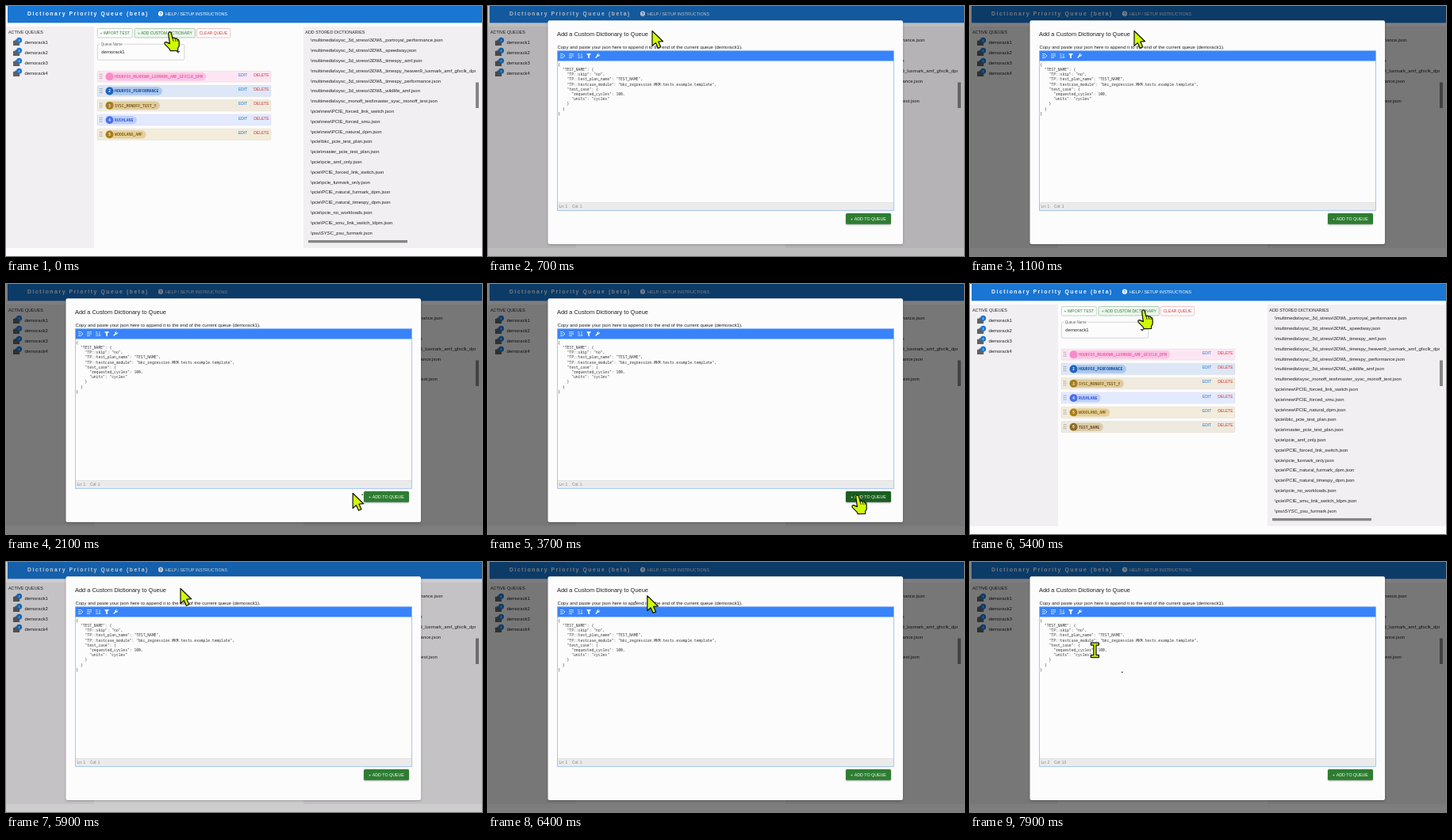
Recreate the animation shown at these times as an HTML page with a canvas. Size 600 px wide and 316 px high, loop 8000 ms.

```html
<!DOCTYPE html>
<html lang="en">
<head>
<meta charset="utf-8">
<title>Dictionary Priority Queue</title>
<style>
html, body { margin: 0; width: 100%; height: 100%; overflow: hidden; background: #fff; }
canvas { display: block; width: 600px; height: 316px; }
</style>
</head>
<body>
<canvas id="stage"></canvas>
<script>
const W = 600, H = 316, LOOP = 8000;
const SANS = '"Liberation Sans", Arial, sans-serif';
const MONO = '"Noto Sans Mono", "DejaVu Sans Mono", monospace';
const BLUE = '#1976d2', RED = '#d32f2f', GREEN = '#2e7d32', DARK_GREEN = '#1b5e20';
const PAPER = '#fdfcfd', PANEL = '#f1eff1', LIME = '#cffa06';

const canvas = document.getElementById('stage');
const ctx = canvas.getContext('2d');
const ratio = window.devicePixelRatio || 1;
canvas.width = W * ratio;
canvas.height = H * ratio;

const clamp = v => Math.max(0, Math.min(1, v));
const smooth = v => v * v * (3 - 2 * v);

// ---- timing ----
const OPEN_1 = 500, CLOSE = 3800, OPEN_2 = 5750, CARET_SET = 7100;

// time, x, y, eased arrival
const PATH = [
  [0, 208, 34], [400, 208, 34], [550, 207, 32], [1700, 207, 32],
  [2100, 437, 265], [2300, 467, 268], [4430, 467, 268], [4530, 466, 268],
  [5200, 220, 34, true], [6200, 220, 34], [6900, 124, 80, true],
  [7700, 124, 80], [7900, 157, 111], [8000, 200, 146]
];

function pointerAt(t) {
  const i = Math.max(1, PATH.findIndex(k => k[0] >= t));
  const [t0, x0, y0] = PATH[i - 1], [t1, x1, y1, eased] = PATH[i];
  let u = clamp((t - t0) / (t1 - t0));
  if (eased) u = smooth(u);
  return { x: x0 + (x1 - x0) * u, y: y0 + (y1 - y0) * u };
}

function openness(t) {
  if (t < CLOSE) return clamp((t - OPEN_1) / 400);
  if (t < OPEN_2) return 1 - clamp((t - CLOSE) / 200);
  return clamp((t - OPEN_2) / 400);
}

// ---- drawing helpers ----
function rect(x, y, w, h, fill) {
  ctx.fillStyle = fill;
  ctx.fillRect(x, y, w, h);
}

function box(x, y, w, h, r, fill, stroke, line = 0.6) {
  ctx.beginPath();
  ctx.roundRect(x, y, w, h, r);
  if (fill) { ctx.fillStyle = fill; ctx.fill(); }
  if (stroke) { ctx.strokeStyle = stroke; ctx.lineWidth = line; ctx.stroke(); }
}

function raised(blur, alpha, paint) {
  ctx.save();
  ctx.shadowColor = `rgba(0,0,0,${alpha})`;
  ctx.shadowBlur = blur * ratio;
  ctx.shadowOffsetY = ratio;
  paint();
  ctx.restore();
}

function disc(x, y, r, fill) {
  ctx.beginPath();
  ctx.arc(x, y, r, 0, Math.PI * 2);
  ctx.fillStyle = fill;
  ctx.fill();
}

function shape(path, fill, stroke, line) {
  const p = new Path2D(path);
  if (fill) { ctx.fillStyle = fill; ctx.fill(p); }
  if (stroke) { ctx.strokeStyle = stroke; ctx.lineWidth = line; ctx.stroke(p); }
}

// y is the middle of the capitals
function text(str, x, y, size, fill, { font = SANS, weight = 400, spacing = 0, align = 'left' } = {}) {
  ctx.font = `${weight} ${size}px ${font}`;
  ctx.letterSpacing = spacing + 'px';
  ctx.textAlign = align;
  ctx.textBaseline = 'alphabetic';
  ctx.fillStyle = fill;
  ctx.fillText(str, x, y + size * 0.36);
}

const inside = (p, x, y, w, h) => p.x >= x && p.x < x + w && p.y >= y && p.y < y + h;

// ---- page ----
// name, row, chip, number disc, ink
const ROWS = [
  ['HOURFOX_MEADOW9_LUXMARK_AMF_GFXCLK_DPM', '#fde6f3', '#fac6e3', '#f88cc8', '#f25fac'],
  ['HOURFOX_PERFORMANCE', '#dde7f6', '#abc7ee', '#1c62c0', '#1c4f9c'],
  ['SYSC_MONOFF_TEST_Y', '#f0ebde', '#dfcb9c', '#a57c1b', '#80611c'],
  ['RUSHLANE', '#e3eaff', '#bccffc', '#4a70ea', '#3659cf'],
  ['WOODLAND_AMF', '#f3ecdb', '#e5d09b', '#ac7d12', '#8c6716'],
  ['TEST_NAME', '#efeadf', '#dacaa8', '#8d6c24', '#6a5120']
];

const FILES = [
  ...['portroyal_performance', 'speedway', 'timespy_amf', 'timespy_heaven9_luxmark_amf_gfxclk_dpm',
    'timespy_performance', 'wildlife_amf'].map(n => 'multimedia\\sysc_3d_stress\\3DWL_' + n),
  'multimedia\\sysc_monoff_test\\master_sysc_monoff_test',
  ...['new\\PCIE_forced_link_switch', 'new\\PCIE_forced_smu', 'new\\PCIE_natural_dpm',
    'bkc_pcie_test_plan', 'master_pcie_test_plan', 'pcie_amf_only', 'PCIE_forced_link_switch',
    'pcie_furmark_only', 'PCIE_natural_furmark_dpm', 'PCIE_natural_timespy_dpm',
    'pcie_no_workloads', 'PCIE_smu_link_switch_ldpm'].map(n => 'pcie\\' + n),
  'psu\\SYSC_psu_furmark'
].map(n => '\\' + n + '.json');

function outlineButton(label, x, w, color, edge, fill) {
  box(x, 28.5, w, 11.5, 1.5, fill, edge);
  text(label, x + w / 2, 34.2, 4.95, color, { align: 'center' });
}

function drawHeader() {
  rect(2, 0, W - 2, 21.3, BLUE);
  text('Dictionary Priority Queue (beta)', 27, 9.7, 6.8, '#f4f8fd', { weight: 700, spacing: 1.58 });
  disc(195, 9.7, 3.1, '#fff');
  text('?', 195, 9.8, 5, BLUE, { weight: 700, align: 'center' });
  text('HELP / SETUP INSTRUCTIONS', 201, 9.7, 5.36, '#fff');
}

function drawQueues() {
  rect(0, 26, 111, 280, PANEL);
  text('ACTIVE QUEUES', 3, 33.5, 5.4, '#222');
  for (let i = 0; i < 4; i++) {
    const y = 46 + i * 13;
    box(9, y - 2.2, 8.2, 6.2, 0.6, '#606060');
    box(11.5, y - 3.6, 3.4, 2, 0.5, '#606060');
    disc(16.6, y - 2.8, 3.5, BLUE);
    text('4', 16.6, y - 2.8, 3.8, '#fff', { align: 'center' });
    text('demorack' + (i + 1), 23.5, y, 5.95, '#222');
  }
}

function drawRow(row, i) {
  const [name, bg, chip, dot, ink] = row;
  const y = 89 + i * 18.3;
  box(115, y - 7, 219, 14.2, 1, bg, 'rgba(90,80,60,.13)', 0.5);
  for (let k = 0; k < 6; k++) rect(118 + (k % 2) * 2.2, y - 3.3 + (k >> 1) * 2.5, 1.1, 1.1, '#8b8b8b');
  box(125, y - 5, 16.4 + name.length * 2.92, 10.4, 5.2, chip);
  disc(130.6, y + 0.2, 4.9, dot);
  if (i) text(String(i + 1), 130.6, y + 0.3, 4.6, '#fff', { weight: 700, align: 'center' });
  text(name, 137, y + 0.3, 4.87, ink, { font: MONO, weight: 600 });
  text('EDIT', 293, y - 2, 5, BLUE);
  text('DELETE', 312.2, y - 2, 5, RED);
}

function drawMain(t, p, free) {
  const over = free && inside(p, 162, 28, 76, 12.5);
  outlineButton('+ IMPORT TEST', 115.3, 44, GREEN, '#97be99');
  outlineButton('+ ADD CUSTOM DICTIONARY', 162, 76.4, GREEN, over ? '#7fb083' : '#97be99', over ? '#eef6ee' : null);
  outlineButton('CLEAR QUEUE', 240.3, 42.4, RED, '#eaa0a0');
  box(115.3, 48.2, 109.5, 20, 1.8, null, '#bcbcbc');
  rect(118.3, 46, 30, 4, PAPER);
  text('Queue Name', 119.7, 48, 4.54, '#666');
  text('demorack1', 120.3, 58.2, 5.95, '#222');
  shape('M214.4 57 H219.6 L217 59.8 Z', '#444');
  ROWS.slice(0, t > CLOSE ? 6 : 5).forEach(drawRow);
}

function drawFiles(p, free) {
  rect(375, 26, 225, 280, PANEL);
  text('ADD STORED DICTIONARIES', 377.3, 33.5, 5.4, '#222');
  ctx.save();
  ctx.beginPath();
  ctx.rect(378, 37, 214, 256.5);
  ctx.clip();
  FILES.forEach((name, i) => {
    const y = 43.3 + i * 12.8;
    if (free && inside(p, 378, y - 6.4, 214, 12.8)) rect(378, y - 6.4, 214, 12.8, '#e1e0e1');
    text(name, 384, y, 5.95, '#222');
  });
  ctx.restore();
  rect(592, 96.5, 4, 32.5, '#858585');
  rect(381, 296, 125, 3.3, '#858585');
}

// ---- dialog ----
const CODE = [
  '{',
  '  "TEST_NAME": {',
  '    "TP::skip": "no",',
  '    "TP::test_plan_name": "TEST_NAME",',
  '    "TP::testcase_module": "bkc_regression.MKM.tests.example.template",',
  '    "test_case": {',
  '      "requested_cycles": 100,',
  '      "units": "cycles"',
  '    }',
  '  }',
  '}'
];

function drawToolbar() {
  rect(87.5, 56.6, 424, 12.9, '#3883fa');
  shape('M91 60.6 H94.5 L97 63 L94.5 65.4 H91 M91 63 H94.5', null, '#dbe8ff', 0.9);
  shape('M102 60.7 H108 M102 63 H108 M102 65.3 H106', null, '#dbe8ff', 0.9);
  shape('M113 60.7 H115.5 M113 63 H116 M113 65.3 H116.5 M118 60 V65.5 M116.8 64.3 L118 65.8 L119.2 64.3', null, '#dbe8ff', 0.8);
  shape('M124 60 H130 L127.9 63 V66.3 L126.1 65.5 V63 Z', '#eef4ff');
  shape('M135.6 65.6 L138.4 62.8', null, '#eef4ff', 1.4);
  disc(139, 62, 1.8, '#eef4ff');
  shape('M139 62 L140.8 60.2', null, '#3883fa', 1);
}

function drawDialog(t, p) {
  raised(3, 0.25, () => box(75.5, 18.2, 447.5, 282.8, 2, PAPER));
  text('Add a Custom Dictionary to Queue', 87, 35.7, 7.44, '#222');
  text('Copy and paste your json here to append it to the end of the current queue (demorack1).', 87.5, 51.5, 5.95, '#222');

  drawToolbar();
  CODE.forEach((line, i) => text(line, 88.3, 74.2 + i * 6.18, 4.7, '#333', { font: MONO }));
  rect(87.5, 248.5, 424, 10, '#ebebeb');
  rect(87.5, 248.3, 424, 0.5, '#d0d0d0');
  const moved = t >= CARET_SET;
  text(moved ? 'Ln: 2' : 'Ln: 1', 89.5, 253.6, 4.8, '#808080');
  text(moved ? 'Col: 13' : 'Col: 1', 106, 253.6, 4.8, '#808080');
  box(87.5, 56.6, 424, 202, 0, null, '#7fb0f6', 0.7);

  const over = inside(p, 451, 262, 57, 14);
  raised(2, 0.3, () => box(451, 262, 57, 13.7, 1.5, over ? DARK_GREEN : GREEN));
  text('+ ADD TO QUEUE', 479.5, 268.8, 5.3, '#fff', { align: 'center' });
}

// ---- pointer ----
const POINTERS = {
  arrow: 'M0 -.5 V18.5 L4.3 14.6 L7.3 21.3 L10.8 19.7 L7.8 13.2 L13.6 12.7 Z',
  hand: 'M-3.4 .6 Q-2.4 -2 0 -.6 L2 6.8 Q4 5.2 5.2 7.2 Q7 6 8 8.2 Q10 8 10.2 11 V16.5 L8.6 19.5 V22.4 L-1 22.6 L-1.8 20.4 L-7.8 14.4 Q-9 11.4 -6 11.6 L-1.6 13.6 Z',
  beam: 'M-5 -9.3 H5 V-6.3 H1.6 V6.3 H5 V9.3 H-5 V6.3 H-1.6 V-6.3 H-5 Z'
};

function pointerKind(p, modal) {
  if (modal) {
    if (inside(p, 451, 262, 57, 14)) return 'hand';
    return inside(p, 88, 70, 423, 178) ? 'beam' : 'arrow';
  }
  const onButton = inside(p, 115, 28, 168, 12.5);
  return onButton || inside(p, 378, 37, 214, 256) ? 'hand' : 'arrow';
}

function drawPointer(t, p, modal) {
  // the small spot runs a little ahead of the pointer
  const next = pointerAt(Math.min(t + 80, LOOP));
  if (Math.hypot(next.x - p.x, next.y - p.y) > 2.5) disc(next.x, next.y, 0.8, '#111');
  const kind = pointerKind(p, modal);
  ctx.save();
  ctx.translate(p.x, p.y);
  ctx.lineJoin = 'round';
  shape(POINTERS[kind], LIME, '#111', 1.2);
  if (kind === 'hand') shape('M2 6.8 L3.2 11 M5.2 7.2 L6 11 M8 8.2 L8.4 11', null, '#111', 0.8);
  ctx.restore();
}

function draw(t) {
  const p = pointerAt(t), open = openness(t), modal = open > 0;
  ctx.setTransform(ratio, 0, 0, ratio, 0, 0);
  rect(0, 0, W, H, PAPER);
  drawHeader();
  drawQueues();
  drawMain(t, p, !modal);
  drawFiles(p, !modal);
  if (modal) {
    rect(0, 0, W, H, `rgba(0,0,0,${open * 0.5})`);
    ctx.globalAlpha = clamp(open * 3);
    drawDialog(t, p);
    ctx.globalAlpha = 1;
  }
  drawPointer(t, p, modal);
}

const start = performance.now();
function tick() {
  draw((performance.now() - start) % LOOP);
  requestAnimationFrame(tick);
}
tick();
</script>
</body>
</html>
```
